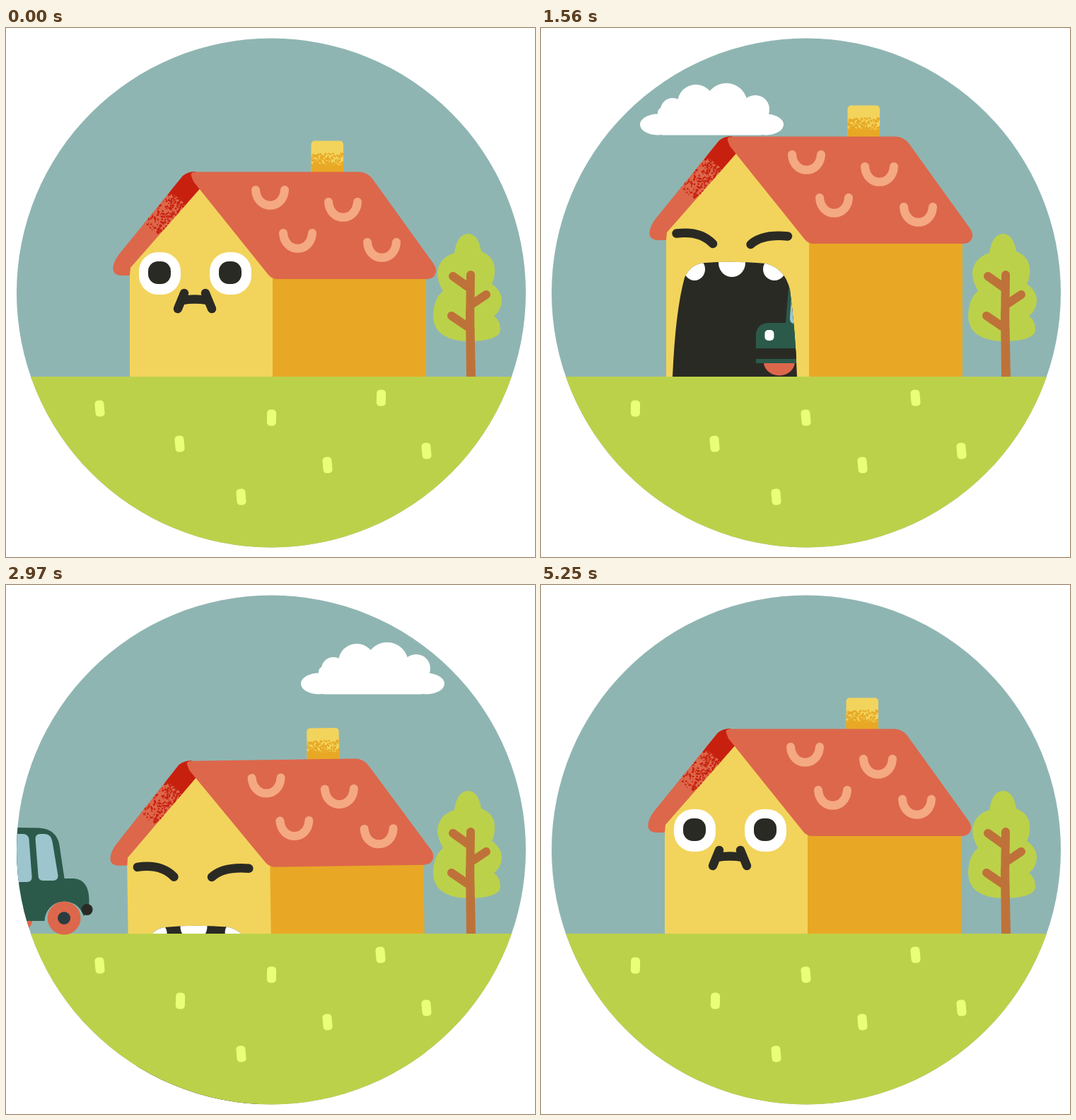
Write an HTML page with a canvas that moves like this. It is 748 by 748 pixels and loops after 5.43 s.

```html
<!DOCTYPE html>
<html>
<head>
<meta charset="utf-8">
<style>
  html, body { margin: 0; width: 100%; height: 100%; overflow: hidden; background: #fff; }
  canvas { display: block; }
</style>
</head>
<body>
<canvas id="stage" width="748" height="748"></canvas>
<script>
const LOOP = 5430, GROUND = 493;
const SKY = '#8fb5b2', GRASS = '#bcd14a', FLECK = '#eaff78', YELLOW = '#f2d45c', ORANGE = '#e8a825',
      ROOF = '#dd674b', RED = '#c8200f', TILE = '#f4a982', BLACK = '#2a2a24', TRUNK = '#be7239',
      CAR = '#2b5a4b', GLASS = '#9cc5ce', HUB = '#2b3c40';
const g = document.getElementById('stage').getContext('2d');
g.lineCap = g.lineJoin = 'round';

const fill = (color, path) => { g.fillStyle = color; g.fill(new Path2D(path)); };
const line = (color, width, path) => {
  g.strokeStyle = color;
  g.lineWidth = width;
  g.stroke(new Path2D(path));
};
const oval = (color, x, y, rx, ry = rx) => {
  g.fillStyle = color;
  g.beginPath();
  g.ellipse(x, y, rx, ry, 0, 0, 7);
  g.fill();
};
const box = (color, x, y, w, h, r) => {
  g.fillStyle = color;
  g.beginPath();
  g.roundRect(x, y, w, h, r);
  g.fill();
};
const group = draw => { g.save(); draw(); g.restore(); };
const mix = (a, b, k) => a + (b - a) * k;

// Eased value from a flat list of time, value pairs
function key(t, ...k) {
  if (t <= k[0]) return k[1];
  for (let i = 2; i < k.length; i += 2) {
    if (t < k[i]) {
      const s = (t - k[i - 2]) / (k[i] - k[i - 2]);
      return mix(k[i - 1], k[i + 1], s * s * (3 - 2 * s));
    }
  }
  return k[k.length - 1];
}

// Specks that thin out from one point towards another
function grain(color, x0, y0, x1, y1, spread, count) {
  let seed = 7;
  const rnd = () => (seed = seed * 16807 % 2147483647) / 2147483647;
  const len = Math.hypot(x1 - x0, y1 - y0), nx = (y1 - y0) / len, ny = (x0 - x1) / len;
  for (let i = 0; i < count; i++) {
    const s = rnd() ** 1.7, d = (rnd() - .5) * spread;
    oval(color, mix(x0, x1, s) + nx * d, mix(y0, y1, s) + ny * d, .7 + rnd() * .9);
  }
}

function cloud(t) {
  group(() => {
    g.translate(.1964 * (t - 1560), 5 * (Math.max(0, t - 1560) / 1980) ** 1.5);
    oval('#fff', 165, 136.5, 25, 15);
    oval('#fff', 318, 136.5, 25, 15);
    oval('#fff', 186, 116, 17);
    oval('#fff', 219, 106, 26);
    oval('#fff', 262, 108, 30);
    oval('#fff', 303, 115, 20);
    box('#fff', 165, 112, 153, 39.5, 8);
  });
}

function tree() {
  fill(GRASS, `M654 291Q668 292 672 316Q692 324 691 344Q691 354 687 362Q701 372 701 386
    Q700 400 690 407Q699 414 699 427Q698 442 655 443Q604 442 604 406Q605 382 618 372
    Q610 358 610 346Q612 325 634 318Q638 291 654 291Z`);
  line(TRUNK, 12, 'M657 349L656 420M632 351L653 366M679 377L658 391M630 407L652 422');
  fill(TRUNK, 'M650 400L662 400L664 494H651Z');
}

function roof() {
  const slab = 'M250 209Q257 203 268 203L276 225L176 339L175 350H163Q147 349 153 332Q156 324 163 316Z';
  fill(ROOF, slab);
  group(() => {
    g.clip(new Path2D(slab));
    g.lineCap = 'butt';
    line(RED, 50, 'M276 201L243 240');
    grain(RED, 243, 240, 205, 285, 44, 330);
  });
  fill(ROOF, `M262 209Q260 204 268 203.5H500Q511 204 518 213L605 334Q611 343 606 350
    Q603 355 594 355L384 355Q376 355 371 349L265 217Z`);
  for (const [x, y] of [[0, 0], [103, 17], [39, 61], [158, 74]])
    line(TILE, 12, `M${353 + x} ${229 + y}C${355 + x} ${258 + y} ${392 + x} ${258 + y} ${394 + x} ${229 + y}`);
}

const MOUTH = `M184 640V543Q188 450 201 403Q210 383 230 382Q268 379 316 383
  Q343 390 350 420Q358 480 360 543V640Z`;

function openMouth() {
  fill(BLACK, MOUTH);
  group(() => {
    g.clip(new Path2D(MOUTH));
    oval('#fff', 215, 391, 15, 16);
    oval('#fff', 268, 382, 19, 20);
    oval('#fff', 328, 391, 16, 16);
  });
}

function closedMouth(wide) {
  const m = (a, b) => mix(a, b, wide);
  const mouth = side => {
    const x = v => 267 + side * v;
    return `M${x(m(15, 43))} ${m(375, 389)}L${x(m(24, 50))} ${m(397, 411)}`;
  };
  const w = m(18, 45);
  line(BLACK, 12.5, mouth(-1) + mouth(1) +
    `M${267 - w} ${m(385, 396)}Q267 ${m(382, 423)} ${267 + w} ${m(385, 396)}`);
}

function eyes(t) {
  const shut = t > 600 && t < 3210 || t > 4140 && t < 4230;
  if (shut) {
    line(BLACK, 12.5, 'M189.500 340.500Q223 336 241 355M294.500 356Q311 341 347 344.500');
    return;
  }
  const look = key(t, 0, 0, 3000, 0, 3200, -10, 4170, -10, 4260, 0);
  for (const x of [217.5, 317.5]) {
    box('#fff', x - 29.5, 317, 59, 60, 27);
    box(BLACK, x - 16.5 + look, 330, 32, 32, 14);
  }
}

function house(t) {
  const dy = key(t, 590, 0, 770, 55, 850, 50, 1020, -95, 1180, -42, 1320, -50,
    2600, -50, 2760, -61, 2930, 38, 3030, 54, 3220, -8, 3400, 0);
  const tilt = key(t, 590, 0, 770, -.8, 850, -.8, 1020, 2.1, 1180, .9, 1320, 0,
    2600, 0, 2760, 2.5, 2930, -.8, 3030, -.8, 3220, .4, 3400, 0);
  const face = key(t, 600, 0, 790, 18, 860, 18, 1050, 0, 2720, 0, 2970, 12, 3050, 14, 3300, 0);
  const drop = key(t, 600, 0, 810, 31, 870, 60, 1070, 0, 2700, 0, 2960, 55, 3040, 75, 3270, 0);
  const wide = key(t, 250, 0, 550, 1, 4170, 1, 4450, 0);
  group(() => {
    g.translate(385 - dy * .04, GROUND + dy);
    g.rotate(tilt * Math.PI / 180);
    g.translate(-385, -GROUND);
    box(YELLOW, 431.5, 159.500, 45.5, 60, 5);
    group(() => {
      g.beginPath();
      g.rect(431.5, 160, 45.5, 60);
      g.clip();
      g.fillStyle = ORANGE;
      g.fillRect(431, 194, 47, 20);
      grain(ORANGE, 454, 195, 454, 177, 46, 230);
    });
    fill(ORANGE, 'M376 340H594V640H376Z');
    fill(YELLOW, 'M175 335L270 215L377 345V640H175Z');
    roof();
    group(() => { g.translate(0, face); eyes(t); });
    g.translate(0, drop);
    if (t > 870 && t < 3040) openMouth(); else closedMouth(wide);
  });
}

function meadow(t) {
  g.fillStyle = GRASS;
  g.fillRect(0, GROUND, 748, 255);
  const spots = [[132, 538], [245, 588], [374, 551], [529, 523], [454, 618], [594, 598], [332, 663]];
  spots.forEach(([x, y], i) => group(() => {
    const jitter = Math.sin(i * 7 + Math.floor(t / 120) * 5) > .75 ? 1 : 0;
    g.translate(x + .5 + jitter, y);
    g.rotate(jitter ? .02 : -.09);
    box(FLECK, -6.5, -11.5, 13, 23, 5);
  }));
}

function car(t) {
  if (t < 1300 || t > 3400) return;
  group(() => {
    // The doorway hides the part still inside
    g.clip(new Path2D('M0 300H200L318 333Q345 340 352 370Q360 430 362 493V520H0Z'));
    g.translate(-.291 * (t - 2460), 0);
    oval(ROOF, 75, 472, 22, 19.5);
    oval(ROOF, 168, 472, 18, 18.5);
    fill(CAR, `M42 474V434Q43 418 60 417H84L88 370Q91 346 116 344.500Q150 342 195 343.500
      Q220 345 224 368L231 415H245Q266 417 266 447Q266 464 258 468A28 28 0 0 0 203 475H171
      A28 28 0 0 0 115 474Z`);
    fill(GLASS, 'M90 410L93 371Q96 352 114 352H133Q139 352 139 360V411Q139 418 132 418H96Q90 418 90 410Z');
    fill(GLASS, 'M149 358Q149 352 156 352H172Q180 352 181 360L185 413Q185 420 178 420H160Q152 420 152 412Z');
    fill(GLASS, 'M190 359Q190 352 197 352H203Q212 352 214 363L222 411Q222 418 215 418H201Q194 418 194 411Z');
    box('#fff', 54.5, 427, 13, 15, 5);
    box(BLACK, 38, 453, 68, 15, 6);
    oval(BLACK, 263, 459, 8);
    for (const x of [143.5, 230.5]) {
      oval(ROOF, x, 471, 23.5);
      oval(HUB, x, 471, 9);
    }
  });
}

function frame(now) {
  const t = Math.floor(now % LOOP / 30) * 30;
  g.clearRect(0, 0, 748, 748);
  group(() => {
    g.beginPath();
    g.arc(375, 374.5, 360, 0, 7);
    g.clip();
    g.fillStyle = SKY;
    g.fillRect(0, 0, 748, 748);
    cloud(t);
    tree();
    house(t);
    meadow(t);
    car(t);
  });
  requestAnimationFrame(frame);
}
requestAnimationFrame(frame);
</script>
</body>
</html>
```
